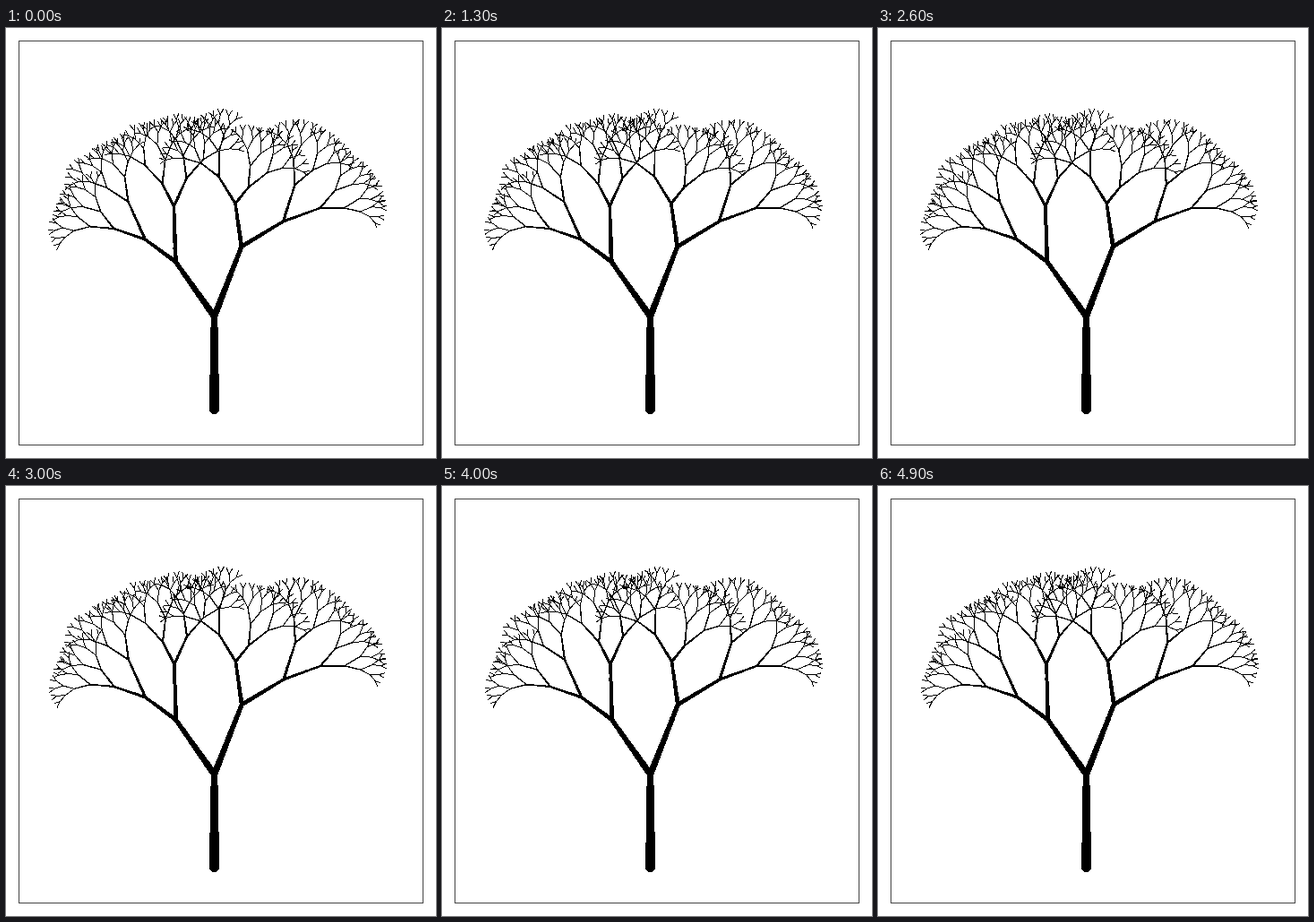
An HTML page for the animation above (5000 ms loop, 480x480 px).

```html
<!DOCTYPE html>
<html lang="en">
<head>
<meta charset="utf-8">
<title>Swaying tree</title>
<style>
  html, body { margin: 0; width: 100%; height: 100%; overflow: hidden; background: #fff; }
  svg { display: block; width: 480px; height: 480px; }
  path, rect { fill: none; stroke: #000; shape-rendering: crispEdges; }
  path { stroke-linecap: round; }
  rect { stroke: #444; }
</style>
</head>
<body>
<svg id="stage" viewBox="0 0 480 480">
  <rect x="14.5" y="14.5" width="451" height="451"/>
</svg>
<script>
const LOOP = 5000;
const STEP = 100;
const LEVELS = 9;
const ROOT = { x: 232.5, y: 425.5 };

// Main forks in heap order: node i branches into 2i and 2i + 1.
const limbs = [
  [232.5, 322],
  [189, 261], [262.5, 244],
  [155, 236], [187, 199], [255.5, 196], [309, 216],
  [120, 224], [136, 194], [174, 174], [201, 168],
  [237, 166], [270, 178], [322, 175], [350, 201]
];

function rand(n) {
  const v = Math.sin(n * 12.9898) * 43758.5453;
  return v - Math.floor(v);
}

const sideOf = i => i % 2 ? 1 : -1;
const widthAt = level => Math.max(1, 11 * 0.66 ** level);

// Twigs fork to both sides and lean back against their parent's turn.
function grow(i, level, from) {
  const lean = -sideOf(i >> 1) * 0.14;
  const angle = from.angle + sideOf(i) * 0.45 + lean + 0.16 * (rand(i) - 0.5);
  const length = 26.5 * 0.71 ** (level - 4) * (0.9 + 0.2 * rand(i + 700));
  return [from.x + length * Math.cos(angle), from.y + length * Math.sin(angle)];
}

const nodes = [ROOT];
for (let i = 1; i < 2 ** LEVELS; i++) {
  const level = Math.floor(Math.log2(i));
  const from = nodes[i >> 1];
  const [x, y] = limbs[i - 1] || grow(i, level, from);
  nodes[i] = { x, y, level, from, angle: Math.atan2(y - from.y, x - from.x) };
}

const stage = document.getElementById("stage");
const strokes = new Map();

function addPiece(width, a, b, p, q) {
  if (!strokes.has(width)) {
    const path = document.createElementNS("http://www.w3.org/2000/svg", "path");
    path.setAttribute("stroke-width", width);
    stage.append(path);
    strokes.set(width, { path, pieces: [] });
  }
  strokes.get(width).pieces.push([a, b, p, q]);
}

// Tapered branches are cut into short pieces of falling width.
for (const node of nodes.slice(1)) {
  const w0 = widthAt(node.level), w1 = widthAt(node.level + 1);
  const parts = Math.ceil((w0 - w1) * 2) || 1;
  for (let j = 0; j < parts; j++) {
    const width = w0 + (w1 - w0) * j / parts;
    addPiece(width.toFixed(2), node.from, node, j / parts, (j + 1) / parts);
  }
}

// A quick swing on top of a slow drift.
function swayAt(t) {
  const turn = 2 * Math.PI * t / LOOP;
  return 0.7 + 1.2 * Math.cos(16 * turn - 4.9) + 0.6 * Math.cos(turn - 2.1);
}

function bend(node, amount) {
  const lift = Math.max(0, 330 - node.y);
  return node.x + amount * (1 - Math.exp(-lift / 90));
}

function draw(t) {
  const amount = swayAt(t);
  const point = (a, b, f) => {
    const ax = bend(a, amount), bx = bend(b, amount);
    return (ax + (bx - ax) * f).toFixed(2) + " " + (a.y + (b.y - a.y) * f).toFixed(2);
  };
  for (const { path, pieces } of strokes.values()) {
    path.setAttribute("d", pieces.map(([a, b, p, q]) =>
      "M" + point(a, b, p) + "L" + point(a, b, q)).join(""));
  }
}

let shown = 0;
function tick() {
  const t = Math.floor(performance.now() % LOOP / STEP) * STEP;
  if (t !== shown) draw(shown = t);
  requestAnimationFrame(tick);
}
draw(0);
requestAnimationFrame(tick);
</script>
</body>
</html>
```
